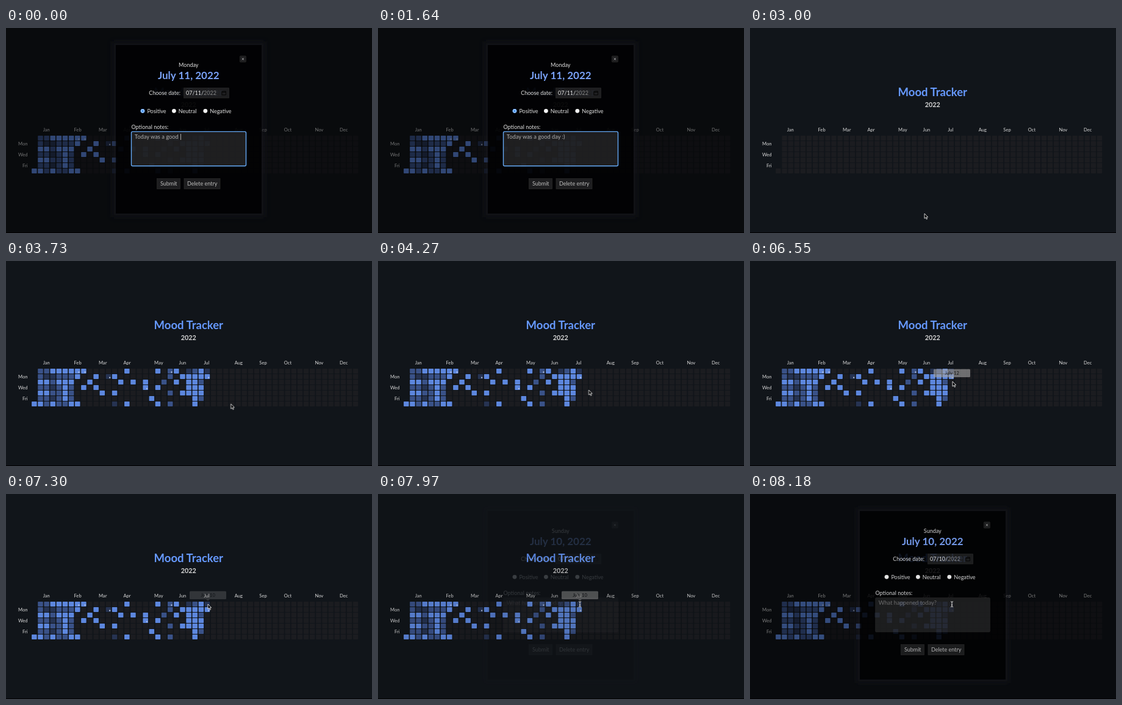
Animation, 600 px wide and 337 px high, one loop 8210 ms. Source, as an HTML page:

```html
<!DOCTYPE html>
<html lang="en">
<head>
<meta charset="utf-8">
<title>Mood Tracker</title>
<style>
  html, body { margin: 0; width: 100%; height: 100%; overflow: hidden; background: #11151a; }
  svg { display: block; width: 100vw; height: 100vh; }
  text, .notes { font-family: Lato, sans-serif; font-size: 9px; fill: #e2e2e2; }
  .title { font-size: 18.5px; font-weight: 700; fill: #6699ff; }
  .date { font-size: 17px; font-weight: 700; fill: #7aa2f7; }
  .year { font-size: 10.8px; font-weight: 700; fill: #d4d4d4; }
  .label { font-size: 7.6px; fill: #d8d8d8; }
  .button { fill: #bdbdbd; text-anchor: middle; }
  .hint { font-size: 9.3px; fill: #747474; }
  .mid { text-anchor: middle; }
  .end { text-anchor: end; }
  .field { fill: #fff; fill-opacity: .11; stroke: #2b2b2b; stroke-width: .7; }
  .tip { fill: #a4a4a4; }
  .tip text { font-size: 7.6px; fill: #111; }
  .pointer { fill: #000; stroke: #fff; stroke-width: .8; }
  .notes { font-size: 9.3px; line-height: 12px; white-space: pre; color: #b0b0b0; }
  .notes span { animation: type 8210ms step-end infinite; }
  .notes i { display: inline-block; width: .7px; height: 10px; margin: 0 -1.2px 0 .5px; background: #aaa; vertical-align: -2px; }
  /* Each letter stays for half a loop from its own delay on. */
  @keyframes type { 0% { font-size: 9.3px; } 50% { font-size: 0; } }
</style>
</head>
<body>
<svg viewBox="0 0 600 337" preserveAspectRatio="none">
  <defs>
    <filter id="blur" x="-10%" y="-10%" width="120%" height="120%"><feGaussianBlur stdDeviation="4"/></filter>
  </defs>
  <rect width="600" height="337" fill="#11151a"/>
  <rect y="336" width="600" height="1"/>
  <text class="title mid" x="299.3" y="112.3">Mood Tracker</text>
  <text class="year mid" x="299.3" y="130.4">2022</text>
  <g id="labels"></g>
  <g id="days" fill="#1b1c20"></g>
  <g id="moods"></g>
  <g id="tips"></g>

  <g id="modal">
    <rect width="600" height="337" opacity=".47"/>
    <rect x="174" y="22" width="251" height="289" fill="#15151a" opacity=".6" filter="url(#blur)"/>
    <rect x="180" y="28" width="239" height="277" opacity=".82"/>
    <rect class="field" x="383.4" y="46" width="10" height="10" rx="1"/>
    <path d="M386.7 49.3l3.4 3.4m0-3.4l-3.4 3.4" stroke="#ccc" stroke-width=".8"/>
    <text class="end" x="286" y="110">Choose date:</text>
    <rect class="field" x="291.5" y="98.7" width="74" height="16.3"/>
    <path d="M354 104h6.5v6h-6.5zM354 105.5h6.5" fill="none" stroke="#050505"/>
    <g id="radios"></g>
    <text x="205.5" y="166">Optional notes:</text>
    <rect class="field" x="205.7" y="170.7" width="187.6" height="56" rx="1"/>
    <rect class="field" x="247.5" y="247.5" width="38" height="17"/>
    <text class="button" x="266.7" y="259.3">Submit</text>
    <rect class="field" x="292" y="247.5" width="59" height="17"/>
    <text class="button" x="321.7" y="259.3">Delete entry</text>

    <g id="monday">
      <text class="mid" x="299.3" y="64">Monday</text>
      <text class="date mid" x="299.3" y="84.2">July 11, 2022</text>
      <text x="295" y="110">07/11/<tspan fill="#858585">2022</tspan></text>
      <circle cx="224" cy="136.3" r="3" fill="#fff" stroke="#1879f2" stroke-width=".9"/>
      <circle cx="224" cy="136.3" r="1.6" fill="#1879f2"/>
      <rect id="ring" x="205.5" y="170.4" width="188" height="56.4" rx="2" fill="none" stroke="#65a9f5" stroke-width="1.4"/>
      <foreignObject x="210.8" y="172.7" width="180" height="50"><div class="notes" id="notes"></div></foreignObject>
    </g>
    <g id="sunday">
      <text class="mid" x="299.3" y="64">Sunday</text>
      <text class="date mid" x="299.3" y="84.2">July 10, 2022</text>
      <text x="295" y="110">07/10/<tspan fill="#858585">2022</tspan></text>
      <text class="hint" x="210.8" y="182">What happened today?</text>
    </g>
  </g>

  <g id="cursor">
    <path class="pointer" id="arrow" d="M0 0v8.2l1.9-1.8 1.4 3 1.3-.6-1.4-2.9h2.5z"/>
    <path class="pointer" id="hand" d="M0 .6q1-1 1.6 0v3.2l3.8 1v3l-1 2.6h-4l-2.6-4 .8-.7 1.4 1.2z"/>
    <path id="beam" d="M-2-4.2q2 0 2 1.2 0-1.2 2-1.2M0-3v6.4M-2 4.6q2 0 2-1.2 0 1.2 2 1.2M-1 1.4h2" fill="none" stroke="#ddd"/>
  </g>
</svg>
<script>
const LOOP = 8210;
const YEAR = 2022;
const WEEK_WIDTH = 10.13, DAY_HEIGHT = 9.02;
const $ = id => document.getElementById(id);
const cellX = week => 42.1 + week * WEEK_WIDTH;
const cellY = day => 176.9 + day * DAY_HEIGHT;
const cell = (week, day, fill) =>
  `<rect x="${cellX(week)}" y="${cellY(day)}" width="8.5" height="8" rx=".8" ${fill ? `fill="${fill}"` : ''}/>`;

// One line per weekday, one letter per week; a capital marks an entry with a note.
const moods = `
.mmbbbbBB......b....b.Mb.dmbd
.mddmmmb..b.Db........m.bbbbB
.bbmbbb..b....b.b.b..m.b.bbm.
.mmdmbm.b.b.......B.b....bbb.
.bbmmbm....b.b........m.bbbb.
.mmdmbm............b......bm.
bbmbmmbb.....d.b....b.m...b..`.trim().split('\n');
const shades = { b: '#5d87de', m: '#3a5288', d: '#263352' };

function drawCalendar() {
  for (let date = new Date(YEAR, 0, 1), n = date.getDay(); date.getFullYear() === YEAR; n++) {
    const week = Math.floor(n / 7), day = n % 7;
    const mood = moods[day][week] || '.';
    $('days').innerHTML += cell(week, day);
    if (mood !== '.') $('moods').innerHTML += cell(week, day, shades[mood.toLowerCase()]);
    if (/[A-Z]/.test(mood)) {
      $('moods').innerHTML += `<circle cx="${cellX(week) + 6.5}" cy="${cellY(day) + 5.8}" r="1.1" fill="#c3cde0"/>`;
    }
    if (date.getDate() === 1) {
      const month = date.toLocaleString('en-US', { month: 'short' });
      $('labels').innerHTML += `<text class="label" x="${cellX(week + 2) - 1.6}" y="169.6">${month}</text>`;
    }
    date.setDate(date.getDate() + 1);
  }
  ['Mon', 'Wed', 'Fri'].forEach((name, i) => {
    $('labels').innerHTML += `<text class="label end" x="35.6" y="${cellY(2 * i + 1) + 6.6}">${name}</text>`;
  });
}

// Builds a looping keyframe rule from [milliseconds, declarations] stops.
const sheet = document.head.appendChild(document.createElement('style'));
function animate(id, stops, easing = 'linear') {
  const body = stops.map(([ms, css]) => `${(ms / LOOP * 100).toFixed(4)}%{${css}}`).join('');
  sheet.textContent += `@keyframes ${id}-loop{${body}}#${id}{animation:${id}-loop ${LOOP}ms ${easing} infinite}`;
}

// Fully shown from `from`, gone at `to`; a span may run over either end of the loop.
function show(id, spans, fadeIn = 1, fadeOut = 1) {
  const stops = spans.flatMap(([from, to]) => [[from - fadeIn, 0], [from, 1], [to - fadeOut, 1], [to, 0]]);
  const inside = stops.filter(([ms]) => ms > 0 && ms < LOOP);
  const all = [[0, spans[0][0] <= 0 ? 1 : 0], ...inside, [LOOP, spans.at(-1)[1] > LOOP ? 1 : 0]];
  animate(id, all.map(([ms, opacity]) => [ms, `opacity:${opacity}`]));
}

drawCalendar();

['Positive', 'Neutral', 'Negative'].forEach((name, i) => {
  const x = 224 + i * 51.4;
  $('radios').innerHTML += `<circle cx="${x}" cy="136.3" r="3.4" fill="#f4f4f4"/><text x="${x + 7.4}" y="139.5">${name}</text>`;
});

const keyTimes = [120, 210, 330, 520, 1000, 1120];
$('notes').innerHTML = 'Today was a good ' + [...'day :)'].map((key, i) =>
  `<span style="animation-delay:${keyTimes[i] - LOOP}ms">${key}</span>`).join('') + '<i id="caret"></i>';

const SUBMIT = 2390, RELOAD = 3000, OPEN = 7940, NEVER = 2 * LOOP;
show('caret', [[0, 1640], [2140, SUBMIT]]);
show('ring', [[0, SUBMIT]]);
show('monday', [[0, RELOAD + 1]]);
show('sunday', [[RELOAD + 2, NEVER]]);
show('modal', [[0, RELOAD], [LOOP - 10, NEVER]], LOOP - 10 - OPEN + 20);
show('moods', [[0, RELOAD], [3700, NEVER]], 640);

// The pointer rises through three days, one tooltip after another.
const hovers = [[12, 6620, 6920], [11, 6970, 7230], [10, 7440, 8030]];
for (const [day, from, to] of hovers) {
  const y = cellY(day - 10) - 10.5;
  $('tips').innerHTML += `<g class="tip" id="tip${day}"><g transform="translate(331 ${y})">
    <rect x="-30" y="-6.6" width="60" height="13.2" rx="1.5"/><path d="M-3 6.6h6l-3 2.6z"/>
    <text class="mid" y="2.7">July ${day}</text></g></g>`;
  show('tip' + day, [[from, to]], 180, 110);
}

show('beam', [[1820, 1990], [OPEN, NEVER]]);
show('arrow', [[1990, 2300], [2670, OPEN]]);
show('hand', [[2300, 2670]]);
const path = [
  [0, 331, 181], [1820, 331, 184], [2200, 272, 277], [SUBMIT, 263, 260], [2660, 263, 260],
  [2700, 286, 305], [3300, 286, 305], [3900, 385, 221], [4260, 345.5, 212], [4550, 345.5, 212],
  [4700, 364, 204], [4880, 341, 212], [5360, 341, 212], [5600, 366, 193], [6270, 366, 193],
  [6550, 332, 198], [6800, 331, 196], [7290, 331, 181], [LOOP, 331, 181]
];
animate('cursor', path.map(([ms, x, y]) => [ms, `transform:translate(${x}px,${y}px)`]), 'ease-in-out');
</script>
</body>
</html>
```
